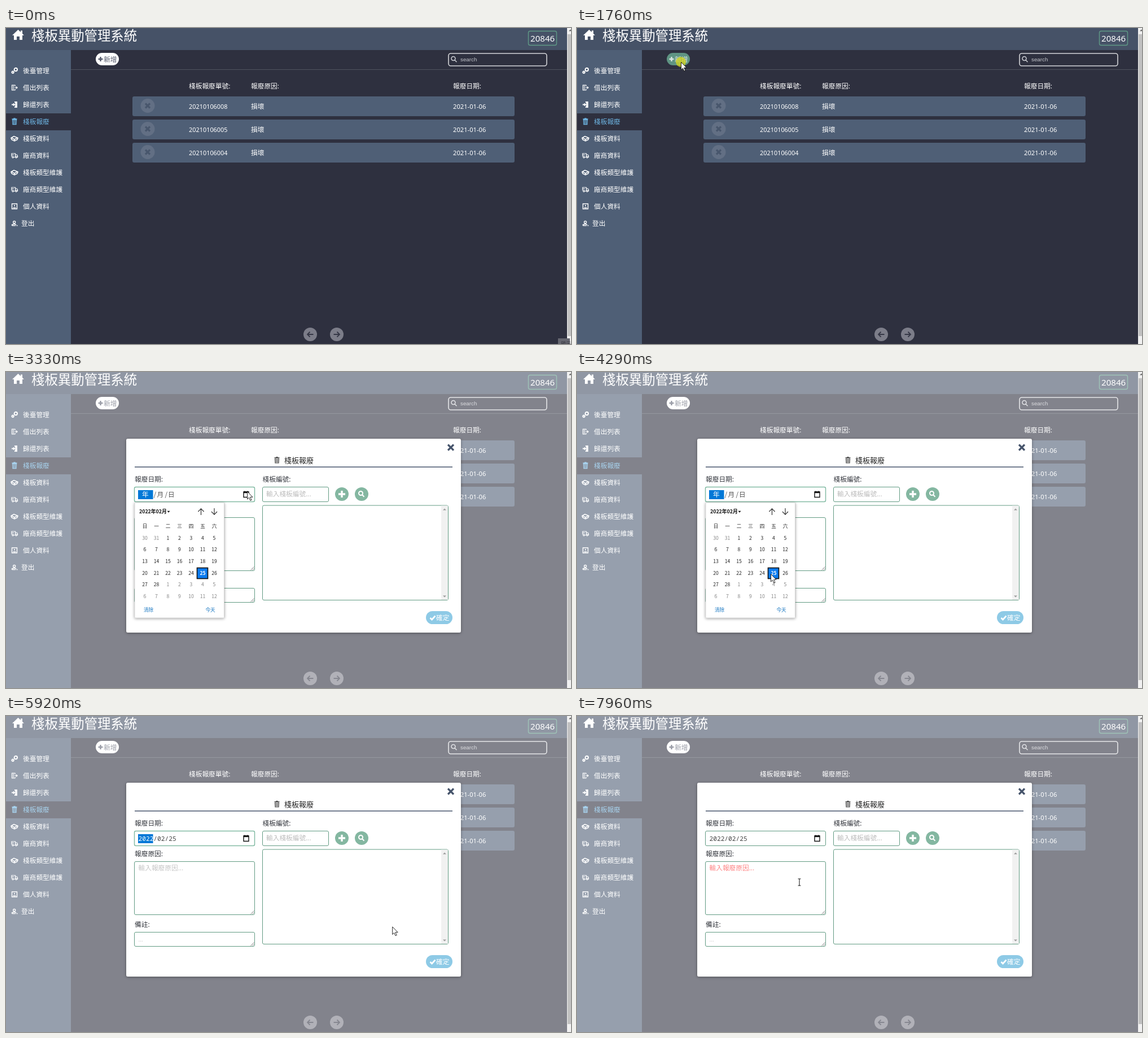
Recreate the animation shown at these times as an HTML page. Size 1001 by 559 pixels, loop 8 s.

```html
<!DOCTYPE html>
<html lang="zh-TW">
<head>
<meta charset="utf-8">
<title>棧板異動管理系統</title>
<style>
  html, body { margin: 0; width: 100%; height: 100%; overflow: hidden; background: #2e303f; }
  svg { display: block; width: 100%; height: 100%; }
  text { font: 11.7px "Noto Sans CJK TC", "Noto Sans CJK JP", sans-serif; white-space: pre; }
  .num { font-family: "Noto Sans", "Open Sans", sans-serif; }
  .mono { font-family: "Noto Sans Mono", "DejaVu Sans Mono", monospace; }
  .arial { font-family: "Liberation Sans", Arial, sans-serif; }
  .field { fill: #fff; stroke: #629b83; }
</style>
</head>
<body>
<svg id="stage" viewBox="0 0 1001 559" preserveAspectRatio="none"></svg>
<script>
const LOOP = 8000;
const SIDE = '#4f5f76', MAIN = '#2e303f', INK = '#33363d', NAVY = '#46546b', BLUE = '#0078d7';

const rect = (x, y, w, h, fill, r = 0, more = '') =>
  `<rect x="${x}" y="${y}" width="${w}" height="${h}" rx="${r}" fill="${fill}" ${more}/>`;
const circle = (x, y, r, fill) => `<circle cx="${x}" cy="${y}" r="${r}" fill="${fill}"/>`;
const text = (x, y, s, fill = '#fff', size = 11.7, cls = '', more = '') =>
  `<text x="${x}" y="${y}" fill="${fill}" class="${cls}" style="font-size:${size}px;${more}">${s}</text>`;
const fillPath = (x, y, d, fill) => `<path transform="translate(${x} ${y})" d="${d}" fill="${fill}"/>`;
const line = (x, y, d, color, w = 1) =>
  `<path transform="translate(${x} ${y})" d="${d}" fill="none" stroke="${color}" stroke-width="${w}"/>`;
const group = (id, body) => `<g id="${id}">${body}</g>`;
const field = (x, y, w, h, id = '') =>
  `<rect id="${id}" class="field" x="${x + .5}" y="${y + .5}" width="${w - 1}" height="${h - 1}" rx="2.5"/>`;

const CROSS = 'M-4-4L4 4M4-4L-4 4';
const PLUS = 'M-4 0H4M0-4V4';
const LENS = 'M2.5-1A3.5 3.5 0 1 1-4.5-1A3.5 3.5 0 1 1 2.5-1M1.6 1.8L5 5.2';
const CHECK = 'M-4.5 0L-1.5 3L4.5-3.5';
const TRASH = 'M-4.5-4.5H4.5M-1.8-5.5H1.8M-3.5-3L-3 5H3L3.5-3ZM-1.2-2V4M1.2-2V4';
const BOXES = 'M-6-1L-1-4L6-1L5 2L0 4.5L-5 2ZM-5-1L0 1.5L5-1M0 1.5V4';
const TRUCK = 'M-5 2V-3.5H1.5V2M1.5-1.5H4L5.5 .5V3H3.5M1.5 3H-1.5M-5-1H-1M-1.5 3A1.3 1.3 0 1 1-4.1 3A1.3 1.3 0 1 1-1.5 3M4.3 3A1.3 1.3 0 1 1 1.7 3A1.3 1.3 0 1 1 4.3 3';

const menu = [
  ['後臺管理', 'M5-2A2.7 2.7 0 1 1-.4-2A2.7 2.7 0 1 1 5-2M-1.2 2.8A1.7 1.7 0 1 1-4.6 2.8A1.7 1.7 0 1 1-1.2 2.8', 2],
  ['借出列表', 'M1-2V-4.5H-4.5V4.5H1V2M-2-4.5V4.5M0 0H5M3-2L5 0L3 2', 1.2],
  ['歸還列表', 'M0-4.5H4V4.5H0M2-4.5V4.5M-5 0H0M-2-2L0 0L-2 2', 1.8],
  ['棧板報廢', TRASH, 1.3],
  ['棧板資料', BOXES, 1.5],
  ['廠商資料', TRUCK, 1.2],
  ['棧板類型維護', BOXES, 1.5],
  ['廠商類型維護', TRUCK, 1.2],
  ['個人資料', 'M-4.5-4.5H4.5V4.5H-4.5ZM-2.5 2.5H2.5M-1-1.2H1M0-2.2V0', 1.4],
  ['登出', 'M1.7-2A2 2 0 1 1-2.3-2A2 2 0 1 1 1.7-2M-4.5 4V2.5L-2 1.5H1L3 2.5M-4.5 4H2M3.5 4H5.5', 1.4],
];

function page() {
  let s = rect(0, 0, 994, 559, MAIN) + rect(0, 0, 994, 39, '#465267') + rect(0, 39, 115, 520, SIDE);
  s += fillPath(21.5, 12, 'M-10.5 1L0-9L4.5-4.8V-7.5H7.5V-2L10.5 1H7.5V9H2.5V3H-2.5V9H-7.5V1Z', '#fff');
  s += text(45, 22.3, '棧板異動管理系統', '#fff', 23.4, '', 'font-weight:500');
  s += rect(925.5, 5.5, 50, 25, 'none', 3, 'stroke="#5f9a86" stroke-width="1.4"');
  s += text(929, 24, '20846', '#fff', 15.1, 'num');

  s += rect(0, 151, 115, 30, MAIN);
  menu.forEach(([name, d, w], i) => {
    const y = 76 + 30 * i, color = i == 3 ? '#6db4e2' : '#fff';
    s += line(15, y - .5, d, color, w) + text(i == 9 ? 27 : 30, y + 4.4, name, color);
  });

  s += rect(115, 73, 879, 1, '#50535f');
  s += rect(159, 44, 41, 22, '#fff', 11, 'id="add"');
  s += `<g id="addLabel" fill="#555a6b" stroke="none">${line(167.5, 55, PLUS, 'currentColor', 2.4)}` +
    text(173, 59.6, '新增', 'currentColor') + '</g>';
  s += rect(784, 45, 174, 22, 'none', 4, 'stroke="#d3d4d8" stroke-width="1.6"');
  s += line(793.5, 55, LENS, '#c9cad0', 1.6) + text(805, 59, 'search', '#c3c4ca', 9.8, 'arial');

  s += text(324, 107.4, '棧板報廢單號:') + text(434, 107.4, '報廢原因:') + text(792, 107.4, '報廢日期:');
  [8, 5, 4].forEach((n, i) => {
    const y = 121 + 41 * i;
    s += rect(224, y, 677, 35, SIDE, 3) + circle(251, y + 16.5, 12.5, '#626f84') +
      line(251, y + 16.5, CROSS, '#48566c', 3.2) +
      text(324, y + 22.3, '2021010600' + n, '#fff', 10.9, 'num') +
      text(434, y + 22.4, '損壞') + text(792, y + 22.3, '2021-01-06', '#fff', 11.2, 'num');
  });
  s += circle(539, 542, 12, '#7c7d89') + line(539, 542, 'M5.5 0H-5M-.5-4.5L-5 0L-.5 4.5', '#353746', 1.8);
  s += circle(586, 542, 12, '#7c7d89') + line(586, 542, 'M-5.5 0H5M.5-4.5L5 0L.5 4.5', '#353746', 1.8);
  return s;
}

function modal() {
  const grip = (x, y) => line(x, y, 'M-6 0L0-6M-3 0L0-3', '#777', .9);
  let s = rect(0, 0, 994, 559, '#fff', 0, 'opacity=".4"');
  s += rect(213, 118, 593, 343, '#fff', 3, 'filter="url(#shadow)"');
  s += line(788, 133.5, 'M-5-5L5 5M5-5L-5 5', NAVY, 3.2);
  s += line(480, 156, TRASH, '#444', 1.2) + text(493, 160.8, '棧板報廢', '#222', 13, '', 'font-weight:500');
  s += rect(228, 167.3, 563, 1.5, NAVY);
  s += text(228, 194.4, '報廢日期:', INK) + text(454.5, 194.4, '棧板編號:', INK);
  s += text(228, 248, '報廢原因:', INK) + text(228, 373.2, '備註:', INK);

  s += field(227, 203, 214, 27, 'dateBox');
  s += group('mark', rect(234, 209, 26.5, 16, BLUE));
  s += group('empty', text(241, 221.3, '年', 'currentColor', 11.7, '', '" id="year') +
    text(261.5, 221, '/', '#555') + text(267.5, 221.3, '月', '#555') +
    text(281.5, 221, '/', '#555') + text(287, 221.3, '日', '#555'));
  s += group('filled', text(234.5, 221, '<tspan id="yyyy">2022</tspan>/02/25', '#444', 11.2, 'mono'));
  s += line(425.5, 216.5, 'M-4.5-4.5H4.5V5H-4.5ZM-2.5-6V-4M2.5-6V-4', '#111', 1.4) + rect(421, 211.5, 9, 2.7, '#111');

  s += field(227, 257, 214, 95) + grip(439.5, 350.5);
  s += text(234.5, 272.6, '輸入報廢原因...', '#c6c6c6', 11.7, '', '" id="hint');
  s += field(227, 382, 214, 26) + grip(439.5, 406.5) + text(234.5, 398.5, '...', '#c6c6c6', 10);
  s += field(454, 203, 118, 27) + text(461, 220.4, '輸入棧板編號...', '#bcbcbc');
  s += circle(595, 216, 12, '#84b7a1') + line(595, 216, 'M-6 0H6M0-6V6', '#fff', 3.4);
  s += circle(630, 216, 12, '#84b7a1') + line(629.5, 215.5, LENS, '#fff', 2);
  s += field(454, 235.5, 330, 168.5) + rect(771, 236.5, 12, 166.5, '#f1f1f1');
  s += fillPath(777, 243, 'M-3 1.5L0-1.5L3 1.5Z', '#999') + fillPath(777, 397, 'M-3-1.5L0 1.5L3-1.5Z', '#999');
  s += rect(744, 423, 47, 23, '#8ecae6', 11.5, 'id="ok"') +
    line(756, 435, CHECK, '#fff', 2.6) + text(762, 439.4, '確定');
  return s;
}

function calendar() {
  const cell = (i, row, s, color, more = '') =>
    text(246 + 20.5 * i, 276.2 + 20.6 * row, s, color, 8.6, '', 'text-anchor:middle;' + more);
  let s = rect(228, 231, 158.5, 204, '#fff', 1, 'filter="url(#shadow)" stroke="#c4c4c4" stroke-width=".7"');
  s += text(236, 250.2, '2022年02月', '#111', 8.8, '', 'font-weight:700');
  s += fillPath(288, 247, 'M-2.5-1.2H2.5L0 1.8Z', '#111');
  s += line(345.5, 247, 'M0 6V-5M-5 0L0-5.3L5 0', '#222', 1.1) + line(369, 247, 'M0-6V5M-5 0L0 5.3L5 0', '#222', 1.1);
  [...'日一二三四五六'].forEach((d, i) => s += cell(i, 0, d, '#222'));
  s += rect(338.5, 346.5, 19, 19, '#0b7bf0', 0, 'stroke="#111" stroke-width="1.6"');
  for (let k = 0; k < 42; k++) {
    const day = k - 1, inMonth = day > 0 && day < 29;
    const label = day < 1 ? day + 31 : inMonth ? day : day - 28;
    s += cell(k % 7, 1 + Math.floor(k / 7), label,
      day == 25 ? '#fff' : inMonth ? '#222' : '#858585', day == 25 ? 'font-weight:700' : '');
  }
  return s + text(244, 424.2, '清除', '#1a78c2', 8.6) + text(353.5, 424.2, '今天', '#1a78c2', 8.6);
}

const stage = document.getElementById('stage');
stage.innerHTML =
  '<defs><filter id="shadow" x="-10%" y="-10%" width="120%" height="120%">' +
  '<feDropShadow dx="0" dy="1" stdDeviation="2.5" flood-opacity=".4"/></filter></defs>' +
  page() + group('modal', modal()) + group('calendar', calendar()) +
  rect(994, 0, 7, 559, '#f1f1f1') + rect(995, 11, 6, 534, '#c1c1c1') + fillPath(1000, 4, 'M-3 1.5L0-1.5L3 1.5Z', '#666') +
  group('tip', rect(978, 549, 21, 10, '#666771') + text(983, 562, '顯示', '#33343c', 9)) +
  group('glow', circle(0, 0, 9, '#d6d61c')) +
  group('arrow', '<path d="M.5.5V14L3.5 11.2L5.8 16.3L8 15.3L5.7 10.3H10Z" fill="#fff" stroke="#111" stroke-width=".9"/>') +
  group('beam', line(0, 0, 'M-2.5-6H-.7L0-5.3L.7-6H2.5M0-5.3V5.3M-2.5 6H-.7L0 5.3L.7 6H2.5', '#222', 1.1));

const el = {};
stage.querySelectorAll('[id]').forEach(e => el[e.id] = e);
el.glow.setAttribute('opacity', .75);

// Pointer moves: start, end, steps, then [share of the move, x, y]
const moves = [
  [330, 1090, 12, [0, 905, 528], [1, 181, 60]],
  [1160, 1160, 1, [0, 184, 60]],
  [2090, 2850, 12, [0, 186, 61], [1, 424, 204]],
  [2920, 2990, 2, [0, 425, 207], [1, 427, 211]],
  [3130, 3890, 11, [0, 427, 211], [.25, 427, 211], [1, 341, 356]],
  [4220, 4290, 2, [0, 342, 357], [1, 343, 357]],
  [4620, 5370, 11, [0, 343, 357], [.2, 350, 358], [.7, 671, 398], [1, 735, 422]],
  [5440, 6200, 12, [0, 748, 430], [.2, 762, 434], [.5, 760, 434], [1, 482, 208]],
  [6270, 7030, 12, [0, 484, 206], [.25, 545, 198], [7 / 11, 661, 275], [1, 756, 411]],
  [7100, 7490, 5, [0, 762, 432], [.5, 767, 438], [1, 767, 438]],
  [7760, 7960, 4, [0, 730, 424], [1, 394, 294]],
];
const clicks = [[1690, 1830], [3130, 3200], [4620, 4690], [7400, 7480]];

function pointer(t) {
  const move = moves.filter(m => t >= m[0]).pop();
  if (!move) return null;
  const [start, end, steps, ...pts] = move;
  const last = Math.max(1, steps - 1);
  let p = end > start ? Math.min(last, Math.floor((t - start) / (end - start) * last + .1)) / last : 0;
  if (pts.length == 2 && steps > 4) p = p * p * (3 - 2 * p);
  const k = Math.max(1, pts.findIndex(q => q[0] >= p));
  const a = pts[k - 1], b = pts[k] || a;
  const f = b == a ? 0 : (p - a[0]) / (b[0] - a[0]);
  return [a[1] + (b[1] - a[1]) * f, a[2] + (b[2] - a[2]) * f];
}

const show = (e, on) => e.setAttribute('visibility', on ? 'visible' : 'hidden');
const within = (q, x, y, w, h) => !!q && q[0] >= x && q[0] <= x + w && q[1] >= y && q[1] <= y + h;

function draw(t) {
  const pos = pointer(t);
  const open = t >= 1830, picking = t >= 3200 && t < 4690, dated = t >= 4690;
  const focus = t >= 3130 && t < 6340;
  const hover = !open && within(pos, 159, 44, 41, 22);
  const typing = open && !picking &&
    (within(pos, 227, 257, 214, 95) || within(pos, 227, 382, 214, 26) || within(pos, 454, 203, 118, 27));

  show(el.tip, t < 70);
  show(el.modal, open);
  show(el.calendar, picking);
  el.add.setAttribute('fill', hover ? '#5f9483' : '#fff');
  el.addLabel.style.color = hover ? '#dce6e2' : '#555a6b';
  el.ok.setAttribute('fill', within(pos, 744, 423, 47, 23) ? '#6db5d8' : '#8ecae6');

  for (const [id, on] of [['mark', focus], ['empty', !dated], ['filled', dated]])
    el[id].style.display = on ? '' : 'none';
  el.empty.style.color = focus ? '#fff' : '#555';
  el.yyyy.setAttribute('fill', focus ? '#fff' : '#444');
  el.dateBox.style.stroke = focus ? '#83bba4' : '';
  el.dateBox.style.strokeWidth = focus ? 1.5 : 1;
  el.hint.setAttribute('fill', t >= 7480 ? '#ff8585' : '#c6c6c6');

  show(el.arrow, pos && !typing);
  show(el.beam, typing);
  show(el.glow, clicks.some(([a, b]) => t >= a && t < b));
  if (pos) for (const id of ['arrow', 'beam', 'glow'])
    el[id].setAttribute('transform', `translate(${pos[0].toFixed(1)} ${pos[1].toFixed(1)})`);
}

const begin = performance.now();
function tick() {
  draw((performance.now() - begin) % LOOP);
  requestAnimationFrame(tick);
}
tick();
</script>
</body>
</html>
```
